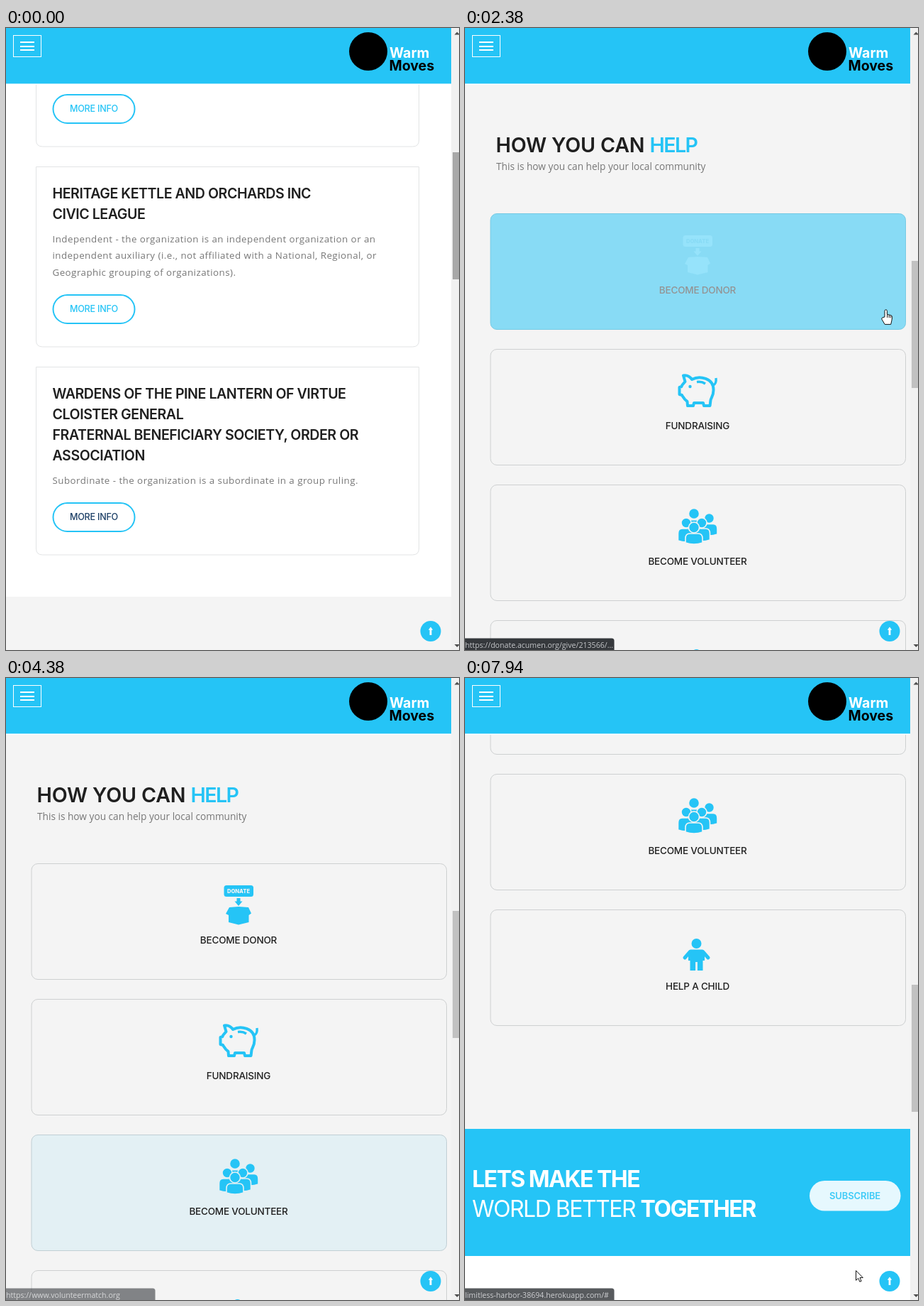
These frames come from a looping animation (639x876 px, 8000 ms). An HTML page:

```html
<!DOCTYPE html>
<html lang="en">
<head>
<meta charset="utf-8">
<title>Community help page</title>
<style>
  html, body { margin: 0; width: 100%; height: 100%; overflow: hidden; background: #fff; }
  svg { display: block; width: 639px; height: 876px; font-family: Inter, sans-serif; font-optical-sizing: none; }
  .title { font-size: 19.6px; font-weight: 600; letter-spacing: -.45px; fill: #1f1f1f; }
  .body { font: 13.3px "Open Sans", sans-serif; letter-spacing: .48px; fill: #777; }
  .lead { font: 13.67px "Open Sans", sans-serif; fill: #777; }
  .big { font-size: 28.6px; font-weight: 600; letter-spacing: -.15px; fill: #1f1f1f; }
  .big tspan { letter-spacing: -1.6px; }
  .cta { font-size: 32px; letter-spacing: -1.5px; fill: #fff; }
  .label { font-size: 13.5px; font-weight: 500; letter-spacing: -.2px; text-anchor: middle; }
  .more { font-size: 12.6px; font-weight: 500; letter-spacing: -.25px; text-anchor: middle; }
  .sub { font-size: 13px; font-weight: 600; letter-spacing: -.1px; text-anchor: middle; }
  .tag { font-size: 7.6px; font-weight: 800; text-anchor: middle; }
  .logo { font-size: 19.5px; font-weight: 700; }
  .url { font: 10.6px "Open Sans", sans-serif; fill: #c4c6c9; }
</style>
</head>
<body>
<script>
const LOOP = 8000, BLUE = [37, 196, 246], WHITE = [255, 255, 255];
const GREY = [244, 244, 244], INK = [31, 31, 31], LINE = [206, 208, 209];
const blue = '#25c4f6';

// ---- markup helpers ----
const text = (cls, x, y, s, extra = '') => `<text class="${cls}" x="${x}" y="${y}" ${extra}>${s}</text>`;
const rect = (x, y, w, h, extra = '') => `<rect x="${x}" y="${y}" width="${w}" height="${h}" ${extra}/>`;
const disc = (x, y, r, extra = '') => `<circle cx="${x}" cy="${y}" r="${r}" ${extra}/>`;
const path = (d, extra = '') => `<path d="${d}" ${extra}/>`;

function infoCard(top, bottom, titles, lines, color) {
  const last = bottom - 74;
  return path(`M42.5 ${top + .5}H582.5V${bottom - 9}q0 9-9 9H51.5q-9 0-9-9Z`, 'fill="#fff" stroke="#e2e4e5"')
    + titles.map((s, i) => text('title', 65.5, top + 44.5 + i * 29.1, s)).join('')
    + lines.map((s, i) => text('body', 65.5, top + 48.5 + titles.length * 29.1 + i * 23.5, s)).join('')
    + rect(66.5, last + 1, 115, 40, `rx="20" fill="#fff" stroke="${blue}" stroke-width="2"`)
    + text('more', 124, last + 25, 'MORE INFO', `fill="${color}"`);
}

function person(x, y, r, w, foot) {
  const neck = y + r + 1;
  return path(`M${x - w} ${foot - 2}V${neck + 7}Q${x - w} ${neck} ${x - w / 2} ${neck}H${x + w / 2}Q${x + w} ${neck} ${x + w} ${neck + 7}V${foot - 2}Q${x} ${foot + 2} ${x - w} ${foot - 2}Z`)
    + disc(x, y, r);
}

// Icons inherit the foreground; class "gap" takes the card background.
const icons = [
  rect(307.5, 31, 41.5, 16, 'rx="3.5"') + text('tag gap', 328, 41.8, 'DONATE')
    + path('M325.5 49h5v4.5h3L328 60l-5.5-6.5h3Z')
    + path('M315 62L328 61L342 62L346 70.5L342.5 73V83L328 86.5L314 83V73L310 71Z'),
  `<g class="draw" fill="none" stroke-width="4" stroke-linejoin="round">`
    + path('M308 37.5C314 36.5 318 40 320 43C331 37 351 41 350.5 58C350.5 66 347 69 346.5 72L345.5 80H337L336 76H323L322 80H314L313.5 74C309 71 308 68 306 65L302.5 64V54L305.5 53C306 50 309 48 310.5 46Z')
    + path('M327 46.5Q334 45.5 339 49', 'stroke-width="3.4"')
    + path('M350 51Q355 49 354 41', 'stroke-width="3.4"') + '</g>' + disc(317.5, 53, 2.2),
  `<g class="rim" stroke-width="1.6">` + person(323, 41, 7.6, 11, 68) + person(344.5, 47.5, 7, 11.5, 72)
    + person(312, 54, 7, 11.5, 81) + person(334, 54, 7, 11.5, 80) + person(323, 60.5, 7.5, 12, 84) + '</g>',
  disc(326.5, 48, 7) + path('M318 56.5h17l3 4V72h-2.5V86h-7.6V74h-2.8V86h-7.6V72h-2.5V60Z')
    + `<g class="draw" fill="none" stroke-width="5" stroke-linecap="round">` + path('M317.5 59.5L310 68M335.5 59.5L343 68') + '</g>'
];
const labels = ['BECOME DONOR', 'FUNDRAISING', 'BECOME VOLUNTEER', 'HELP A CHILD'];

const helpCards = labels.map((s, i) => `<g class="help" transform="translate(0 ${1015 + 191 * i})">`
  + rect(36, .5, 585.5, 163, 'class="box" rx="9"') + `<g class="icon">${icons[i]}</g>`
  + text('label', 328, 112.5, s) + '</g>').join('');

const page =
  infoCard(-100, 167, [], [], blue)
  + infoCard(195, 449, ['HERITAGE KETTLE AND ORCHARDS INC', 'CIVIC LEAGUE'], [
    'Independent - the organization is an independent organization or an',
    'independent auxiliary (i.e., not affiliated with a National, Regional, or',
    'Geographic grouping of organizations).'], blue)
  + infoCard(477, 742, ['WARDENS OF THE PINE LANTERN OF VIRTUE', 'CLOISTER GENERAL',
    'FRATERNAL BENEFICIARY SOCIETY, ORDER OR', 'ASSOCIATION'],
    ['Subordinate - the organization is a subordinate in a group ruling.'], '#1c3f66')
  + rect(0, 801, 628, 1096, 'fill="#f4f4f4"')
  + text('big', 43.5, 929, `HOW YOU CAN <tspan fill="${blue}">HELP</tspan>`)
  + text('lead', 44, 953.5, 'This is how you can help your local community')
  + helpCards
  + rect(0, 1897, 628, 179, `fill="${blue}"`)
  + text('cta', 10, 1979, 'LETS MAKE THE', 'font-weight="700"')
  + text('cta', 10, 2021, 'WORLD BETTER <tspan font-weight="700">TOGETHER</tspan>')
  + rect(486, 1970, 128.5, 42.5, 'id="pill" rx="21.2"')
  + text('sub', 550, 1996, 'SUBSCRIBE', 'id="pillText"');

const chrome =
  rect(0, 78, 628, 2, 'fill="#fff"') + rect(0, 0, 628, 78.4, `fill="${blue}"`)
  + rect(10.5, 10.5, 39, 30, 'fill="none" stroke="#fff"')
  + path('M20 20H40M20 26H40M20 31H40', 'stroke="#fff" stroke-width="2"')
  + disc(511, 33, 27)
  + text('logo', 541, 42, 'Warm', 'fill="#fff"') + text('logo', 540.5, 60, 'Moves')
  + disc(599, 849.5, 14.5, `fill="${blue}"`)
  + path('M599 843.5l3.2 4.2h-1.8v7.3h-2.8v-7.3h-1.8Z', 'fill="#fff"')
  + `<g id="status">` + path('M0 859.5H207q3.5 0 3.5 3.5V876H0Z', 'fill="#35383c"') + text('url', 0, 873, '', 'id="url"') + '</g>'
  + rect(628, 0, 11, 876, 'fill="#f1f1f1"')
  + path('M632.5 9.5l3.8-4 3.8 4ZM632.5 868l3.8 4 3.8-4Z', 'fill="#505050"')
  + rect(630, 0, 9, 179, 'id="thumb"')
  + disc(-1, -3, 11, 'id="press" fill="#eab54a" fill-opacity=".8"')
  + `<g id="cursor" fill="#fff" stroke="#111" stroke-linejoin="round">`
  + path('M.5 .5V14.2l3.2-3 2.2 5 2.2-1-2.1-4.7h4.3Z', 'id="arrow"')
  + path('M-1.7 10V1.6a1.7 1.7 0 0 1 3.4 0V6.5l5.4 1.2q2 .6 1.8 3l-.7 4.5-1.2 5.3H-1.5L-5.6 13.6q-1-2.2.8-2.6Z M2 7v4M4.6 7.6v3.6M7 8.4v3', 'id="hand"')
  + '</g>';

document.body.innerHTML = `<svg viewBox="0 0 639 876"><g id="page">${page}</g>${chrome}</svg>`;
const $ = id => document.getElementById(id);
const cards = [...document.querySelectorAll('.help')].map(g => ({
  box: g.querySelector('.box'), icon: g.querySelector('.icon'), label: g.querySelector('.label'),
  gaps: g.querySelectorAll('.gap'), draws: g.querySelectorAll('.draw'), rims: g.querySelectorAll('.rim')
}));

// ---- timeline ----
const drags = [[380, 2105, 0, 754, 91], [4870, 5610, 754, 1262, 115]];  // start, end, from, to, grip
const hovers = [[2290, 3042], [3070, 3687], [3705, 4185], [5965, 6630]];
const pillHover = [7230, 7760];
const hands = [[2300, 3045], [3110, 3690], [3715, 4185], [7240, 7765]];
const thumbHovers = [[0, 2200], [4610, 5700]];
const urls = [
  [2350, 3740, 3740, 'https://donate.acumen.org/give/213566/...'],
  [3740, 4300, 4500, 'https://www.volunteermatch.org'],
  [7400, 7900, 8140, 'limitless-harbor-38694.herokuapp.com/#']
];
const route = [
  [0, 643, 262], [70, 638, 262], [130, 635, 264], [380, 637, 266], [2105, 637, 419],
  [2200, 634, 415], [2600, 545, 375], [2860, 530, 365], [3000, 515, 390], [3090, 501, 482],
  [3400, 484, 560], [3687, 476, 616], [3715, 475, 644], [3870, 473, 739], [4050, 490, 735],
  [4185, 622, 690], [4250, 646, 640], [4600, 646, 443], [4610, 637, 443], [5610, 637, 546],
  [5700, 634, 548], [5850, 600, 510], [6010, 426, 452], [6240, 412, 462], [6560, 412, 462],
  [6640, 424, 489], [7000, 497, 675], [7320, 540, 728], [7620, 540, 728], [7760, 543, 752], [7940, 551, 834], [8000, 551, 838]
];

const clamp = v => Math.min(1, Math.max(0, v));
const within = (t, [a, b]) => t >= a && t < b;
const mix = (a, b, k) => `rgb(${a.map((v, i) => Math.round(v + (b[i] - v) * k))})`;
const swing = p => (1 - Math.cos(Math.PI * clamp(p))) / 2;

// CSS "ease": cubic-bezier(.25, .1, .25, 1)
function ease(p) {
  p = clamp(p);
  const curve = (u, a, b) => 3 * u * (1 - u) ** 2 * a + 3 * u * u * (1 - u) * b + u ** 3;
  let lo = 0, hi = 1;
  for (let i = 0; i < 16; i++) {
    const mid = (lo + hi) / 2;
    if (curve(mid, .25, .25) < p) lo = mid; else hi = mid;
  }
  return curve(lo, .1, 1);
}
const fade = (t, [a, b]) => ease((t - a) / 300) - ease((t - b) / 300);

function along(t) {
  const i = Math.max(1, route.findIndex(k => k[0] > t));
  const [a, b] = [route[i - 1], route[i]], k = (t - a[0]) / (b[0] - a[0]);
  return [a[1] + (b[1] - a[1]) * k, a[2] + (b[2] - a[2]) * k];
}

const set = (el, name, value) => el.setAttribute(name, value);
const show = (el, on) => { el.style.display = on ? '' : 'none'; };

function draw(t) {
  const scroll = drags.reduce((s, [a, b, from, to]) => s + (to - from) * swing((t - a) / (b - a)), 0);
  const thumbY = 175 + scroll * .2034;
  const drag = drags.find(d => within(t, d));
  set($('page'), 'transform', `translate(0 ${-Math.round(scroll)})`);
  set($('thumb'), 'y', Math.round(thumbY));
  set($('thumb'), 'fill', drag ? '#7c7a7a' : thumbHovers.some(h => within(t, h)) ? '#a8a8a8' : '#c1c1c1');

  cards.forEach((c, i) => {
    const k = fade(t, hovers[i]);
    const lit = t < hovers[i][1] ? k : 0;   // foreground snaps back on leave
    const back = mix(GREY, BLUE, k), front = mix(BLUE, WHITE, lit);
    set(c.box, 'fill', back);
    set(c.box, 'stroke', mix(LINE, BLUE, k));
    set(c.icon, 'fill', front);
    set(c.label, 'fill', mix(INK, WHITE, lit));
    c.gaps.forEach(e => set(e, 'fill', back));
    c.rims.forEach(e => set(e, 'stroke', back));
    c.draws.forEach(e => set(e, 'stroke', front));
  });

  const k = fade(t, pillHover);
  set($('pill'), 'fill', mix(WHITE, BLUE, k));
  set($('pillText'), 'fill', mix(BLUE, WHITE, k));

  const link = urls.find(u => t >= u[0] && t < Math.max(u[1], u[2]));
  show($('status'), link);
  if (link) {
    const [, hold, end, s] = link;
    $('url').textContent = s;
    set($('status'), 'opacity', t < hold ? 1 : clamp((end - t) / (end - hold)));
  }

  let [x, y] = along(t);
  if (drag) y = thumbY + drag[4];
  set($('cursor'), 'transform', `translate(${x.toFixed(1)} ${y.toFixed(1)})`);
  set($('press'), 'transform', `translate(${x} ${y})`);
  show($('press'), drag);
  const hand = hands.some(h => within(t, h));
  show($('hand'), hand);
  show($('arrow'), !hand);
}

const begin = performance.now();
function tick() {
  draw((performance.now() - begin) % LOOP);
  requestAnimationFrame(tick);
}
tick();
</script>
</body>
</html>
```
